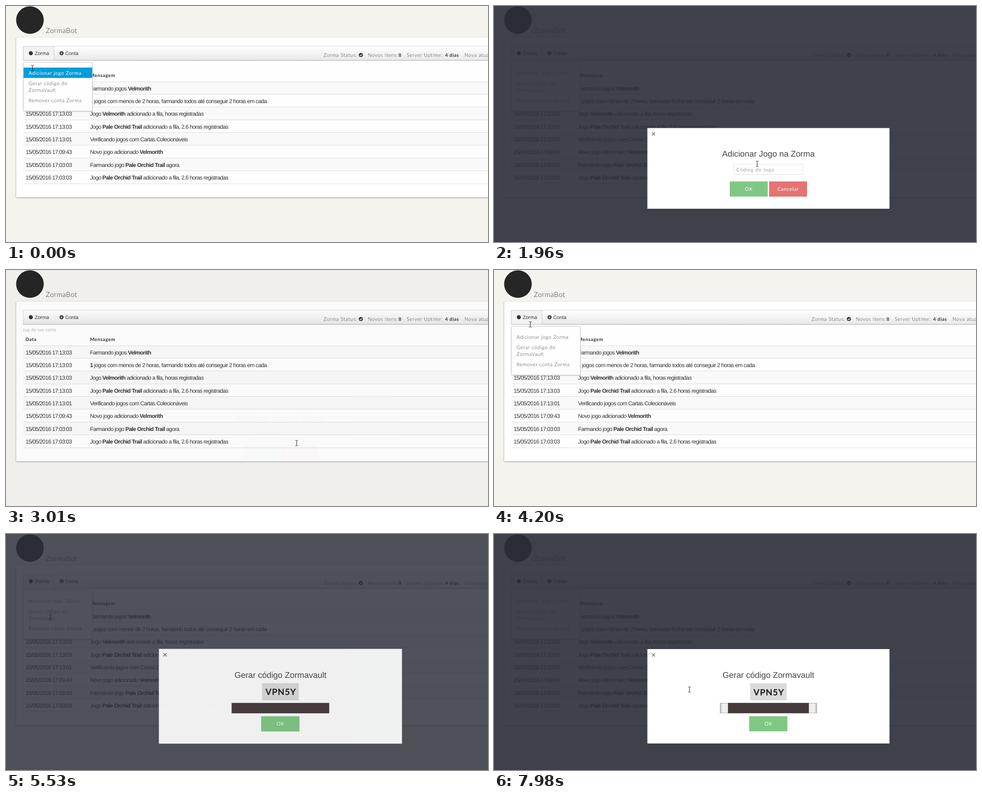
An HTML page for the animation above (8000 ms loop, 1067 px wide and 525 px high).

```html
<!DOCTYPE html>
<html lang="pt">
<head>
<meta charset="utf-8">
<title>ZormaBot</title>
<style>
  html, body { margin: 0; width: 100%; height: 100%; overflow: hidden; background: #f5f3ee; }
  svg { display: block; }
  text { fill: #333; text-rendering: geometricPrecision; }
  .round { font: 300 11px Lato, sans-serif; letter-spacing: .7px; }
  .strong { font-weight: 700; font-size: 10.5px; letter-spacing: .6px; }
  .row { font: 12.5px "Liberation Sans", Arial, sans-serif; letter-spacing: -.66px; }
  .row tspan { font-weight: 700; }
  .nav { font: 11px "Liberation Sans", Arial, sans-serif; }
  .title { font: 18.35px "Liberation Sans", Arial, sans-serif; fill: #444; text-anchor: middle; }
  .label { font-weight: 400; fill: #fff; text-anchor: middle; }
  .cross { stroke: #777; stroke-width: 1.7; }
  .soft { filter: drop-shadow(0 1px 1.5px rgba(0, 0, 0, .4)); }
  .faint { filter: drop-shadow(0 1px 1.5px rgba(0, 0, 0, .2)); }
</style>
</head>
<body>
<svg width="1067" height="525" viewBox="0 0 1067 525">
  <defs>
    <linearGradient id="bar" x2="0" y2="1">
      <stop stop-color="#fff"/><stop offset="1" stop-color="#e9e9e9"/>
    </linearGradient>
    <linearGradient id="track">
      <stop stop-color="#aaa"/><stop offset=".025" stop-color="#eee"/>
      <stop offset=".975" stop-color="#eee"/><stop offset="1" stop-color="#aaa"/>
    </linearGradient>
  </defs>

  <rect width="1067" height="525" fill="#f5f3ee"/>
  <circle cx="53" cy="31.3" r="30.6" fill="#262626"/>
  <text class="round" x="88" y="60" style="font-size:15.5px;letter-spacing:.4px">ZormaBot</text>
  <rect class="soft" x="22.5" y="70" width="1060" height="355.5" rx="2" fill="#fefefe"/>

  <rect x="38" y="89.5" width="1040" height="31" fill="url(#bar)" stroke="#d9d9d9"/>
  <path d="M38 121H1067" stroke="#aaa"/>
  <rect id="pressed" x="38.5" y="89.5" width="68" height="31" fill="#f2f2f2" stroke="#d0d0d0"/>
  <circle cx="55" cy="105" r="4.5" fill="#333"/>
  <text class="nav" x="63.5" y="108.5">Zorma</text>
  <g fill="none" stroke="#333">
    <circle cx="123" cy="105" r="2.6" stroke-width="2.2"/>
    <circle cx="123" cy="105" r="4" stroke-width="1.8" stroke-dasharray="1.57"/>
  </g>
  <text class="nav" x="131" y="108.5">Conta</text>

  <g class="round">
    <text x="703" y="113">Zorma Status:</text>
    <circle cx="785.5" cy="109" r="4.6" fill="#333"/>
    <path d="M783 109l2 2 3-3.5" fill="none" stroke="#fff" stroke-width="1.4"/>
    <text x="801" y="113">Novos itens:</text>
    <text x="869" y="113" class="strong">8</text>
    <text x="887" y="113">Server Uptime:</text>
    <text x="972" y="113" class="strong">4 dias</text>
    <text x="1015" y="113">Nova atualização</text>
    <text id="caption" x="38" y="136" style="font-size:9.5px;font-style:italic;letter-spacing:.5px;fill:#777">Log da sua conta</text>
    <text x="43" y="158" class="strong">Data</text>
    <text x="186" y="158" class="strong">Mensagem</text>
  </g>
  <g id="rows"></g>

  <g id="menu" class="round">
    <rect class="faint" x="38.5" y="125.5" width="152.5" height="108" rx="3" fill="#fefefe" stroke="#ccc"/>
    <rect id="highlight" x="39" width="152" fill="#009ddb"/>
    <g class="item"><text x="50" y="153">Adicionar jogo Zorma</text></g>
    <g class="item"><text x="50" y="176">Gerar código do</text><text x="50" y="191">ZormaVault</text></g>
    <g class="item"><text x="50" y="214">Remover conta Zorma</text></g>
  </g>

  <rect id="overlay" width="1067" height="525" fill="#2b2e38"/>

  <g id="addDialog">
    <rect x="339.5" y="271.5" width="536" height="179.5" fill="#fff"/>
    <path class="cross" d="M349.5 281l7 7m0-7l-7 7"/>
    <text class="title" x="607.5" y="335">Adicionar Jogo na Zorma</text>
    <rect x="531" y="352" width="153" height="22.5" rx="2" fill="#fff" stroke="#ddd"/>
    <text class="round" x="536.5" y="367.5" style="font-weight:400;fill:#aaa09c">Códiog do Jogo</text>
    <rect x="522" y="390.3" width="84" height="33.7" fill="#81c784"/>
    <text class="round label" x="564" y="411">OK</text>
    <rect id="cancel" x="609" y="390.3" width="84" height="33.7"/>
    <text class="round label" x="651" y="411">Cancelar</text>
  </g>

  <g id="codeDialog">
    <rect id="panel" x="339.5" width="536" fill="#fff"/>
    <g id="head">
      <path class="cross" d="M349.5 265.5l7 7m0-7l-7 7"/>
      <text class="title" x="607.5" y="320">Gerar código Zormavault</text>
    </g>
    <g id="code">
      <rect x="567" y="332" width="81" height="38" fill="#dbdbdb"/>
      <text class="round" x="608.5" y="358.5" text-anchor="middle" style="font-size:19px;font-weight:700;letter-spacing:1px;fill:#111">VPN5Y</text>
      <rect x="500" y="376" width="215" height="22.5" fill="url(#track)"/>
      <path d="M500 376.5H715M500 398H715" stroke="#aaa"/>
      <rect id="meter" y="375.7" height="23" fill="#463b3b"/>
    </g>
    <g id="foot">
      <rect x="565" y="405.3" width="84.5" height="33.7" fill="#81c784"/>
      <text class="round label" x="607.5" y="426">OK</text>
    </g>
  </g>

  <path id="cursor" d="M-3 -6h2l1 1 1-1h2M-3 6h2l1-1 1 1h2M0 -5V5" fill="none" stroke="#222"/>
</svg>
<script>
const $ = id => document.getElementById(id);
const items = document.querySelectorAll('.item');
const LOOP = 8000, STEP = 70, FADE = 235;

const log = [
  ['17:13:03', 'Farmando jogos *Velmorith*'],
  ['17:13:03', '*1* jogos com menos de 2 horas, farmando todos até conseguir 2 horas em cada'],
  ['17:13:03', 'Jogo *Velmorith* adicionado a fila, horas registradas'],
  ['17:13:03', 'Jogo *Pale Orchid Trail* adicionado a fila, 2.6 horas registradas'],
  ['17:13:01', 'Verificando jogos com Cartas Colecionáveis'],
  ['17:09:43', 'Novo jogo adicionado *Velmorith*'],
  ['17:03:03', 'Farmando jogo *Pale Orchid Trail* agora'],
  ['17:03:03', 'Jogo *Pale Orchid Trail* adicionado a fila, 2.6 horas registradas'],
];
$('rows').innerHTML = log.map(([time, message], i) => {
  const y = 168.5 + 28.35 * i;
  return `<rect x="38" y="${y}" width="1040" height="28.35" fill="${i % 2 ? '#fefefe' : '#f9f9f9'}"/>
    <path d="M38 ${Math.round(y) - .5}H1067" stroke="#ddd"/>
    <text class="row" x="43.5" y="${y + 19}">15/05/2016 ${time}</text>
    <text class="row" x="186" y="${y + 19}">${message.replace(/\*(.+?)\*/g, '<tspan>$1</tspan>')}</text>`;
}).join('') + '<path d="M38 395.5H1067" stroke="#ddd"/>';

// Pointer stops: time, x, y
const stops = [
  [70, 58, 138], [350, 86, 147], [560, 86, 147], [630, 94, 154], [910, 94, 154],
  [1540, 572, 333], [1750, 582, 351], [1960, 582, 351], [2240, 703, 400], [2520, 645, 401],
  [2800, 645, 401], [3010, 643, 385], [3570, 237, 194], [3920, 76, 105], [4060, 76, 105],
  [4760, 98, 185], [5600, 98, 185], [6090, 344, 294], [6370, 432, 346],
];
const ticks = [6160, 6370, 7140, 7280, 7980];

const clamp = x => Math.min(1, Math.max(0, x));

// CSS "ease" curve, solved by bisection
function ease(x) {
  if (x <= 0 || x >= 1) return clamp(x);
  let low = 0, high = 1, u;
  for (let i = 0; i < 20; i++) {
    u = (low + high) / 2;
    if (.75 * u * (1 - u) + u ** 3 < x) low = u; else high = u;
  }
  return .3 * u * (1 - u) ** 2 + 3 * u * u * (1 - u) + u ** 3;
}
const fade = (t, start) => ease((t - start) / FADE);

function pointerAt(t) {
  const next = stops.findIndex(s => s[0] > t);
  if (next < 1) return (next ? stops[stops.length - 1] : stops[0]).slice(1);
  const a = stops[next - 1], b = stops[next], k = (t - a[0]) / (b[0] - a[0]);
  return [a[1] + (b[1] - a[1]) * k, a[2] + (b[2] - a[2]) * k];
}

const show = (id, on) => $(id).setAttribute('display', on ? 'inline' : 'none');

function set(id, attributes) {
  for (const name in attributes) $(id).setAttribute(name, attributes[name]);
}

function dialog(id, opacity, scale) {
  show(id, opacity > 0);
  set(id, { opacity, transform: `translate(607.5 361) scale(${scale}) translate(-607.5 -361)` });
}

function draw(t) {
  const [x, y] = pointerAt(t);
  const inside = (left, top, right, bottom) => x >= left && x <= right && y >= top && y <= bottom;
  const opened = fade(t, 692), closed = fade(t, 2815), second = fade(t, 5376);
  const first = opened - closed;
  const menuOpen = t < 2800 || t >= 4060;

  set('cursor', { transform: `translate(${Math.round(x) + .5} ${Math.round(y)})` });
  set('overlay', { opacity: .9 * (first + second) });
  show('menu', menuOpen);
  show('caption', !menuOpen);
  show('pressed', menuOpen || inside(38, 89, 107, 121));

  const edges = [137, 160, 198, 221];
  const blocked = t >= 770 && t < 3050 || t >= 5320;
  const hovered = blocked || !inside(39, 137, 191, 221) ? -1 : edges.findIndex(e => e > y) - 1;
  show('highlight', menuOpen && hovered >= 0);
  if (hovered >= 0) set('highlight', { y: edges[hovered], height: edges[hovered + 1] - edges[hovered] });
  items.forEach((item, i) => item.querySelectorAll('text').forEach(line => {
    line.style.fill = i === hovered ? '#fff' : '';
    line.style.fontWeight = i === hovered ? 400 : '';
  }));

  dialog('addDialog', first, 1.05 - .05 * opened - .05 * closed);
  set('cancel', { fill: inside(609, 390, 693, 424) ? '#ef5350' : '#e57373' });

  const loaded = t >= 5460, shift = loaded ? 0 : 27;
  dialog('codeDialog', second, 1.05 - .05 * second);
  set('panel', { y: 256 + shift, height: 210 - 2 * shift });
  set('head', { transform: `translate(0 ${shift})` });
  set('foot', { transform: `translate(0 ${-shift})` });
  show('code', loaded);
  const width = 215 * (1 - ticks.filter(tick => tick <= t).length / 30);
  set('meter', { x: 607.5 - width / 2, width });
}

function frame(now) {
  draw(Math.floor(now % LOOP / STEP) * STEP);
  requestAnimationFrame(frame);
}
draw(0);
requestAnimationFrame(frame);
</script>
</body>
</html>
```
